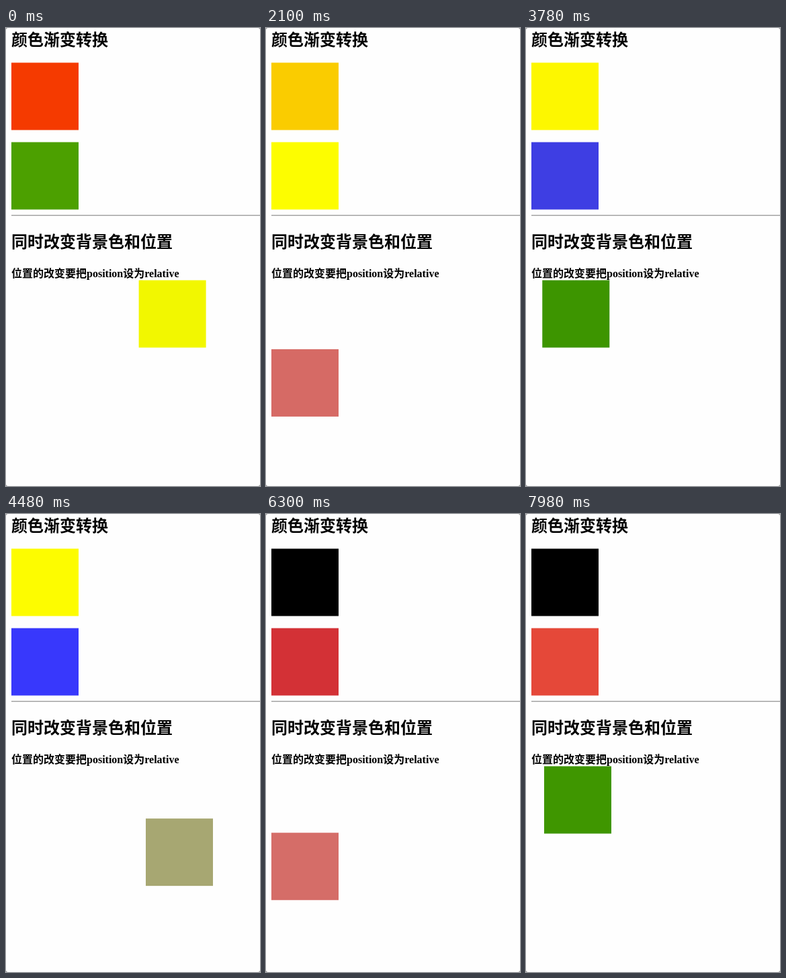
These frames come from a looping animation (378x680 px, 8 s). An HTML page:

```html
<!DOCTYPE html>
<html lang="zh-CN">
<head>
<meta charset="utf-8">
<style>
  html, body { margin: 0; width: 100%; height: 100%; overflow: hidden; background: #888; }
  svg { display: block; width: 378px; height: 680px; background: #fefefe; border-radius: 3px; }
  text { font-family: "Liberation Serif", "Noto Sans CJK SC", "Noto Sans CJK", serif; font-weight: 700; fill: #000; }
  .title { font-size: 24px; }
  .note { font-size: 16px; }
</style>
</head>
<body>
<svg viewBox="0 0 378 680">
  <text class="title" x="8" y="25.5">颜色渐变转换</text>
  <rect id="fade" x="8" y="51.5" width="100" height="100"/>
  <rect id="cycle" x="8" y="169.5" width="100" height="100"/>
  <rect x="8" y="277.5" width="370" height="1.5" fill="#a4a4a4"/>
  <text class="title" x="8" y="326">同时改变背景色和位置</text>
  <text class="note" x="8" y="370">位置的改变要把position设为relative</text>
  <rect id="mover" width="100" height="100"/>
</svg>
<script>
const LOOP = 8000, STEP = 70;
const LEAD = 377;        // time already played when the loop begins
const SLOWDOWN = 1.0512; // playback stretch
const FADE = 5000 * SLOWDOWN, CYCLE = 10000 * SLOWDOWN, LAP = 2000 * SLOWDOWN;

const red = [1, 0, 0], yellow = [1, 1, 0], blue = [0, 0, 1],
      green = [0, 0.5, 0], gray = [0.69, 0.69, 0.69], black = [0, 0, 0];
const colors = [green, yellow, blue, red, gray];
const corners = [[0, 0], [200, 0], [200, 200], [0, 200], [0, 0]];

const screenMix = [[0.9, 0.08, 0.02], [0.02, 0.96, 0.02], [0, 0, 1]];
const SCREEN_GAMMA = 2.2, RECORDED_GAMMA = 2.59;

const [fade, cycle, mover] = ["fade", "cycle", "mover"].map(id => document.getElementById(id));

// CSS "ease": cubic-bezier(.25, .1, .25, 1)
function ease(x) {
  let low = 0, high = 1;
  for (let i = 0; i < 24; i++) {
    const u = (low + high) / 2;
    if (0.75 * u * (1 - u) + u ** 3 < x) low = u; else high = u;
  }
  const u = (low + high) / 2;
  return 0.3 * u * (1 - u) ** 2 + 3 * u * u * (1 - u) + u ** 3;
}

// Value at progress 0..1 through evenly spaced keyframes, eased between each pair
function between(keys, progress) {
  const position = progress * (keys.length - 1);
  const index = Math.min(Math.floor(position), keys.length - 2);
  const k = ease(position - index);
  return keys[index].map((a, i) => a + (keys[index + 1][i] - a) * k);
}

function paint(box, color) {
  const light = color.map(c => c ** SCREEN_GAMMA);
  const shown = screenMix.map(row => {
    const sum = row.reduce((total, weight, i) => total + weight * light[i], 0);
    return Math.round(255 * sum ** (1 / RECORDED_GAMMA));
  });
  box.setAttribute("fill", `rgb(${shown})`);
}

function draw(time) {
  const t = Math.floor(time / STEP) * STEP + LEAD;
  paint(fade, t < FADE ? between([red, yellow], t / FADE) : black);
  paint(cycle, between(colors, t / CYCLE));

  const phase = t / LAP % 2;
  const progress = phase < 1 ? phase : 2 - phase;
  const [left, top] = between(corners, progress);
  mover.setAttribute("x", 8 + left);
  mover.setAttribute("y", 374.5 + top);
  paint(mover, between(colors, progress));
}

const start = performance.now();
function tick() {
  draw((performance.now() - start) % LOOP);
  requestAnimationFrame(tick);
}
tick();
</script>
</body>
</html>
```
